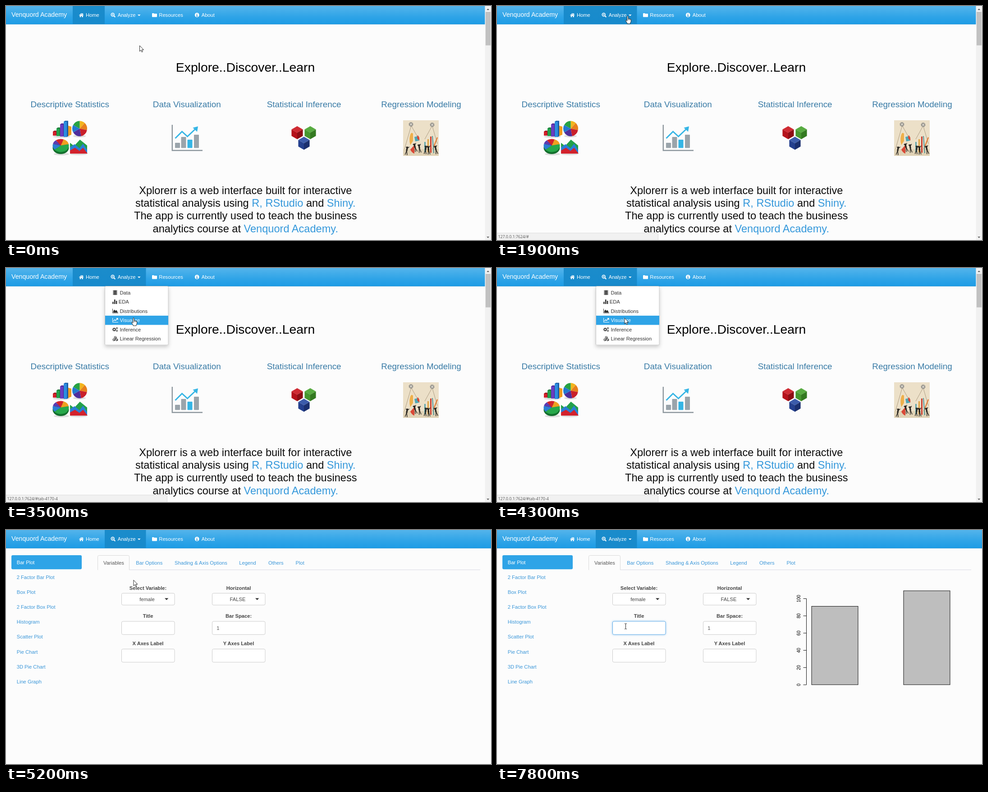
Write an HTML page that moves like this. It is 1076x520 px and loops after 8 s.

```html
<!DOCTYPE html>
<html lang="en">
<head>
<meta charset="utf-8">
<title>Statistics web app</title>
<style>
  html, body { margin: 0; width: 100%; height: 100%; overflow: hidden; background: #fcfcfc; }
  svg { display: block; width: 1076px; height: 520px; font-family: "Liberation Sans", Arial, sans-serif; }
  text { white-space: pre; }
</style>
</head>
<body>
<svg id="stage" viewBox="0 0 1076 520" xmlns="http://www.w3.org/2000/svg"></svg>
<script>
const BLUE = '#2fa4e7', LINK = '#3b97d9', DARK = '#178acc', INK = '#333';
const LOOP = 8000, STEP = 100;

const text = (x, y, s, size = 11.2, fill = INK, more = '') =>
  `<text x="${x}" y="${y}" font-size="${size}" fill="${fill}" ${more}>${s}</text>`;
const mid = (x, y, s, size, fill, more = '') => text(x, y, s, size, fill, 'text-anchor="middle" ' + more);
const rect = (x, y, w, h, fill, more = '') =>
  `<rect x="${x}" y="${y}" width="${w}" height="${h}" fill="${fill}" ${more}/>`;
const path = (d, fill = 'currentColor', more = '') => `<path d="${d}" fill="${fill}" ${more}/>`;
const line = (d, color, width = 1, more = '') => path(d, 'none', `stroke="${color}" stroke-width="${width}" ${more}`);
const disc = (x, y, r, fill, more = '') => `<circle cx="${x}" cy="${y}" r="${r}" fill="${fill}" ${more}/>`;
const group = (id, body, more = '') => `<g id="${id}" ${more}>${body}</g>`;
const at = (x, y, body) => `<g transform="translate(${x} ${y})">${body}</g>`;
const caret = (x, y, w, fill) => path(`M${x} ${y}h${w}l${-w / 2} ${w / 2}z`, fill);

// Icons, about 12 by 10 units, in the current colour
const ring = (x, y, r, w) => disc(x, y, r, 'none', `stroke="currentColor" stroke-width="${w}"`);
const axes = line('M.5 0V9.5H13', 'currentColor', 1);
const hexagon = (x, y, r) => {
  const p = [];
  for (let i = 0; i < 6; i++) p.push([x + r * Math.sin(i * Math.PI / 3), y - r * Math.cos(i * Math.PI / 3)]);
  return p;
};
const poly = (pts, fill, more = '') => `<polygon points="${pts.map(p => p.join()).join(' ')}" fill="${fill}" ${more}/>`;
const icons = {
  home: path('M0 5.6L5.2 .8L7.4 2.8V1.2H9V4.3L10.5 5.6L9.8 6.3L5.2 2.3L.7 6.3zM1.7 6.1L5.2 3.1L8.8 6.1V9.8H6.3V7H4.2V9.8H1.7z'),
  search: ring(4.2, 4.2, 3.4, 1.6) + line('M6.8 6.8L9.8 9.8', 'currentColor', 2) + line('M2.4 4.2H6M4.2 2.4V6', 'currentColor', 1),
  folder: path('M0 2Q0 1 1 1H3.6Q4.5 1 4.5 2H9.8Q11 2 11 3V8.6Q11 9.5 10 9.5H1Q0 9.5 0 8.5z'),
  info: disc(5, 5, 4.9, 'currentColor') + line('M5 1.8V3.3M5 4.2V8M3.8 4.7H5M3.7 8H6.4', DARK, 1.3),
  data: [0, 2.7, 5.4, 8].map(y => path(`M1 ${y + .8}Q6 ${y - 1} 11 ${y + .8}V${y + 1.5}Q6 ${y + 3.2} 1 ${y + 1.5}z`)).join(''),
  bars: rect(.2, 5, 2.4, 5, 'currentColor') + rect(3.9, 0, 2.6, 10, 'currentColor') + rect(7.8, 3, 2.6, 7, 'currentColor'),
  area: axes + path('M2 8.5V5L4.5 2L7 4.5L9.5 3L12 8.5z'),
  trend: axes + line('M2 7L5 4L7 5.8L11.5 1.4M8.7 1H12V4.2', 'currentColor', 1.4),
  gears: ring(4, 5.2, 2.5, 1.7) + ring(4, 5.2, 3.6, 1).replace('/>', ' stroke-dasharray="1.4 1.4"/>') + ring(10, 2.3, 1.5, 1.1) + ring(10, 8, 1.5, 1.1),
  cubes: [[6.5, 2.5], [3.4, 7.4], [9.6, 7.4]].map(([x, y]) =>
    poly(hexagon(x, y, 2.7), 'none', 'stroke="currentColor" stroke-width="1"') +
    path(`M${x} ${y}L${x + 2.3} ${y - 1.3}V${y + 1.3}L${x} ${y + 2.6}zM${x} ${y}L${x - 2.3} ${y - 1.3}`) +
    line(`M${x - 2.3} ${y - 1.3}L${x} ${y}`, 'currentColor', .8)).join('')
};
const icon = (name, x, y) => at(x, y, icons[name]);

// Top bar
const navItem = (name, ix, x, label) => icon(name, ix, 15) + text(x, 24, label, 11.2, '#fff');
const nav = rect(0, 0, 1076, 40, 'url(#bar)') + rect(0, 40, 1076, 1, '#4aa3d8') +
  group('homeOn', rect(148, 0, 71, 40, 'url(#on)')) + group('analyzeOn', rect(219, 0, 91.5, 40, 'url(#on)')) +
  `<g color="#fff">` + text(12, 24.3, 'Venquord Academy', 14.2, '#fff') +
  navItem('home', 162, 177, 'Home') + navItem('search', 232.5, 247.7, 'Analyze') + caret(292, 19, 6.6, '#fff') +
  navItem('folder', 324, 339.3, 'Resources') + navItem('info', 418.7, 433.7, 'About') + '</g>';

// Pictures on the start page
function pie(cx, cy, rx, ry, start, slices) {
  let a = start;
  const pt = v => `${cx + rx * Math.cos(v)} ${cy + ry * Math.sin(v)}`;
  return slices.map(([share, fill]) => {
    const b = a + share * 2 * Math.PI;
    const d = `M${cx} ${cy}L${pt(a)}A${rx} ${ry} 0 ${share > .5 ? 1 : 0} 1 ${pt(b)}z`;
    a = b;
    return path(d, fill);
  }).join('');
}
function bar3d(x, y, base, front, side) {
  return rect(x, y, 7, base - y, front) + path(`M${x + 7} ${y}l3 -2V${base - 2}l-3 2z`, side) + path(`M${x} ${y}l3 -2h7l-3 2z`, side);
}
const charts =
  `<ellipse cx="123" cy="290" rx="19" ry="3" fill="#ddd"/><ellipse cx="163" cy="289" rx="14" ry="3" fill="#ddd"/>` +
  `<ellipse cx="123" cy="329" rx="17" ry="3" fill="#ddd"/><ellipse cx="161" cy="329" rx="19" ry="2.5" fill="#ddd"/>` +
  bar3d(104, 279, 288, '#d3202b', '#8f1019') + bar3d(112, 272, 289, '#22a04a', '#126e2e') +
  bar3d(120, 263, 290, '#6a3cc0', '#44208a') + bar3d(128, 257, 291, '#2c8de0', '#1a5da8') +
  path('M138 266l7 2v18l-7 3z', '#f09a1c') +
  pie(163.5, 272.5, 16.5, 17, -1.57, [[.12, '#f2b51d'], [.16, '#e8801c'], [.19, '#c9202a'], [.2, '#4f2d9c'], [.16, '#2378d0'], [.17, '#27a243']]) +
  `<ellipse cx="121.5" cy="315" rx="18" ry="14" fill="#14702e"/>` +
  pie(121.5, 310, 18, 14.5, -.2, [[.42, '#27a84a'], [.15, '#2b7ed4'], [.11, '#5b3bb0'], [.16, '#d3222c'], [.16, '#f0a020']]) +
  path('M142 327V304L151 311L164 297L180 310V327z', '#22a04a') +
  path('M142 327V314L152 307L163 316L171 306L180 320V327z', '#2a7fd6') +
  path('M142 328V321L153 315L163 322L171 315L181 328z', '#d3222c');

const GREY = '#9aa4ab', CYAN = '#35b5e5';
const growth = line('M368.8 264V321H436', '#8b959c', 2.4) +
  [[375, 304, GREY], [388.5, 291, GREY], [402.5, 297, CYAN], [417, 286, GREY]]
    .map(([x, y, c]) => rect(x, y, 11, 315.5 - y, c, 'rx="1"')).join('') +
  line('M375.5 294L390.5 279L402.5 290L422 271.5', CYAN, 3) + path('M414.5 270.5L426 267.5L424 279.5z', CYAN);

function cube(x, y, top, left, right) {
  const p = hexagon(x, y, 14.5), c = [x, y];
  return poly([p[5], p[0], p[1], c], top) + poly([p[5], c, p[3], p[4]], left) + poly([c, p[1], p[2], p[3]], right);
}
const cubes = cube(646, 281.5, '#cf2b33', '#b5121b', '#8d0d14') + cube(675, 281.5, '#58ab41', '#46972f', '#347a21') +
  cube(661, 305, '#3c5cab', '#24408e', '#1a2f6e');

const worker = (x, y, tilt) => `<g transform="translate(${x} ${y}) rotate(${tilt})" stroke="#26231f" fill="none">` +
  disc(0, -13, 1.9, '#26231f', 'stroke="none"') + line('M0 -11V-5', '#26231f', 3.2) +
  line('M0 -6L-2 4M0 -6L2.6 4M0 -10L4 -15M0 -10L-3 -14', '#26231f', 1.4) + '</g>';
const team = rect(881, 254, 79, 79, '#ece0c8') + rect(881, 318, 79, 15, '#e0d2b5') +
  line('M899 266L884 318M899 266L917 298M945 267L929 296M946 268L957 306', '#9b8b70', .8) +
  [[898.5, 263], [945.5, 264]].map(([x, y]) => disc(x, y, 3.5, '#d9d5cb', 'stroke="#8c8a85" stroke-width="3" stroke-dasharray="2 .7"')).join('') +
  path('M899 282A9 19 0 0 0 897 309L903 300V283z', '#eeb04b') + path('M897 319L906 309V328Q900 326 897 319z', '#d94836') +
  path('M906 291l8 -2l3 10l-9 2z', '#4fa7b4') + path('M913 287q5 3 4 12l-5 -5z', '#d94836') +
  rect(928, 302, 3, 23, '#63a7ac') + rect(935, 296, 3, 29, '#e0a340') + rect(941, 290, 3, 36, '#cb3f32') +
  line('M947 318L957 292', '#e0813c', 2.4) + line('M946 289L949 327', '#51939a', 2) +
  [[888, 327, 10], [909, 320, -14], [918, 322, -8], [930, 325, 8], [938, 326, -5], [955, 325, -12]].map(w => worker(...w)).join('');

// Start page
const blue = s => `<tspan fill="#3498db">${s}</tspan>`;
const headings = [[141.7, 'Descriptive Statistics'], [401.3, 'Data Visualization'], [661.2, 'Statistical Inference'], [921, 'Regression Modeling']];
const intro = [
  'Xplorerr is a web interface built for interactive',
  `statistical analysis using ${blue('R, RStudio')} and ${blue('Shiny.')}`,
  'The app is currently used to teach the business',
  `analytics course at ${blue('Venquord Academy.')}`
];
const startPage = mid(531, 145.7, 'Explore..Discover..Learn', 28.3, '#000') +
  headings.map(([x, s]) => mid(x, 225.2, s, 18.9, '#397ba6')).join('') +
  charts + growth + cubes + team +
  intro.map((s, i) => mid(531.3, 417.6 + i * 28.4, s, 23.6, '#0a0a0a')).join('');

const scrollbar = rect(1062.5, 0, 13.5, 520, '#f1f1f1') + rect(1064, 13, 11, 74.5, '#c1c1c1') +
  path('M1066.3 9l3 -3.2l3 3.2z', '#606060') + path('M1066.3 512.5l3 3.2l3 -3.2z', '#606060');

// Drop-down menu
const ROW = 20.5, MENU_TOP = 44;
const menuItems = [['data', 'Data', 252.5], ['bars', 'EDA', 249.7], ['area', 'Distributions', 252.5],
  ['trend', 'Visualize', 252.5], ['gears', 'Inference', 252.5], ['cubes', 'Linear Regression', 252.5]];
const menu = rect(219.5, 40.5, 140.5, 130.5, '#fff', 'stroke="#c6c6c6" rx="2" filter="url(#shadow)"') +
  rect(220, 0, 140, ROW, BLUE, 'id="rowOn"') +
  menuItems.map(([name, label, x], i) =>
    group('item' + i, icon(name, 236, 49.5 + i * ROW) + text(x, 58.6 + i * ROW, label, 11.2, 'currentColor'))).join('');

const status = rect(-1, 504.5, 358.5, 17, '#f1f1f1', 'stroke="#dcdcdc" rx="2"') +
  text(2.5, 516.3, '', 8.75, '#555', 'id="url" style="font-family:\'Open Sans\',\'Noto Sans\',sans-serif"');

// Plot page
const sideItems = ['Bar Plot', '2 Factor Bar Plot', 'Box Plot', '2 Factor Box Plot', 'Histogram', 'Scatter Plot',
  'Pie Chart', '3D Pie Chart', 'Line Graph'];
const tabs = [[216, 'Variables'], [288.3, 'Bar Options'], [374, 'Shading &amp; Axis Options'], [517.3, 'Legend'], [582, 'Others'], [642.5, 'Plot']];
const label = (x, y, s) => mid(x, y, s, 11.15, '#444', 'font-weight="bold"');
const box = (x, y, h, id = '') => rect(x + .5, y + .5, 117.5, h, '#fff', `rx="3" stroke="#ccc" ${id}`);
const select = (x, s) => box(x, 140, 26.3) + mid(x + 57, 157.6, s, 11.2, '#444') + caret(x + 96, 151.6, 8.4, INK);
const plotPage = rect(12, 56, 156, 31.2, BLUE, 'rx="3"') +
  sideItems.map((s, i) => text(23.7, 75.9 + i * 33.1, s, 11.2, i ? LINK : '#fff')).join('') +
  line('M203 88.5H1052', '#d9d9e4') +
  path('M203.5 89.5V59.5Q203.5 56.5 206.5 56.5H270.5Q273.5 56.5 273.5 59.5V89.5', '#fcfcfc') +
  line('M203.5 88.5V59.5Q203.5 56.5 206.5 56.5H270.5Q273.5 56.5 273.5 59.5V88.5', '#d9d9d9') +
  tabs.map(([x, s], i) => text(x, 76.5, s, 11.2, i ? LINK : '#555')).join('') +
  label(315, 132.6, 'Select Variable:') + label(516, 132.6, 'Horizontal') +
  label(315, 194.8, 'Title') + label(516, 194.8, 'Bar Space:') +
  label(315, 256.2, 'X Axes Label') + label(516, 256.2, 'Y Axes Label') +
  select(256, 'female') + select(457, 'FALSE') +
  group('glow', rect(255.5, 202.5, 119, 30.5, '#66afe9', 'rx="4" filter="url(#blur)"')) +
  box(256, 202.5, 29.3, 'id="titleBox"') + box(457, 202.5, 29.3) + text(467.3, 221.5, '1', 11.2, '#555') +
  box(256, 264, 29.3) + box(457, 264, 29.3);

const tickY = v => 344 - v * 1.915;
const ticks = [0, 20, 40, 60, 80, 100];
const barPlot = line(`M686.5 344V${tickY(100)}` + ticks.map(v => `M686.5 ${tickY(v)}h-7`).join(''), '#111') +
  ticks.map(v => mid(0, 0, v, 10, '#000', `transform="translate(672.5 ${tickY(v)}) rotate(-90)"`)).join('') +
  [[698, 91], [902, 109]].map(([x, n]) => rect(x, tickY(n) - .2, 103, 344 - tickY(n), '#bebebe', 'stroke="#111"')).join('');

// Pointers, with the hot spot at the origin
const outline = 'stroke="#111" stroke-width=".9" stroke-linejoin="round"';
const pointers = {
  arrow: path('M0 0V12.8L2.9 10.1L4.8 14.4L6.8 13.5L4.9 9.3H8.9z', '#fff', outline),
  hand: path('M-1.2 1Q-1.2 -.4 0 -.4Q1.2 -.4 1.2 1V5.6Q2.6 4.8 3.4 6Q4.9 5.3 5.7 6.7Q7.3 6.2 7.5 8V11.4Q7.3 13.4 6 15V17H-1V15.2Q-3.2 12.6 -4.4 10Q-4.4 8.5 -3 9L-1.2 10.8z', '#fff', outline) +
    line('M1.2 5.6V9M3.4 6V9M5.7 6.7V9', '#111', .8),
  beam: line('M-2.5 -6H-.6L0 -5.4L.6 -6H2.5M0 -5.4V5.4M-2.5 6H-.6L0 5.4L.6 6H2.5', '#222', 1)
};

const stage = document.getElementById('stage');
stage.innerHTML = `<defs>
  <linearGradient id="bar" x2="0" y2="1"><stop stop-color="#54b4eb"/><stop offset=".6" stop-color="${BLUE}"/><stop offset="1" stop-color="#1d9ce5"/></linearGradient>
  <linearGradient id="on" x2="0" y2="1"><stop stop-color="#1b8ccb"/><stop offset="1" stop-color="${DARK}"/></linearGradient>
  <filter id="shadow" x="-10%" y="-10%" width="120%" height="125%"><feDropShadow dx="0" dy="4" stdDeviation="4" flood-opacity=".2"/></filter>
  <filter id="blur" x="-10%" y="-30%" width="120%" height="160%"><feGaussianBlur stdDeviation="2.3"/></filter>
  </defs>` + rect(0, 0, 1076, 520, '#fcfcfc') +
  group('start', startPage) + group('plots', plotPage + group('chart', barPlot)) + nav +
  group('scroll', scrollbar) + group('menu', menu) + group('status', status) +
  group('pointer', Object.keys(pointers).map(k => group(k, pointers[k])).join(''));

const el = id => document.getElementById(id);
const show = (id, on) => el(id).setAttribute('display', on ? 'inline' : 'none');

// Pointer route: time, x, y
const route = [[0, 296.5, 88], [400, 296.5, 88], [1400, 289.8, 22.5], [2200, 289.8, 22.5], [2700, 284.6, 68.2], [3100, 284.6, 68.2],
  [3500, 283, 111.3], [6200, 283, 111.3], [6500, 283, 131.3], [7000, 284.5, 203], [7300, 285.5, 214], [LOOP, 285.5, 214]];
function pointerAt(t) {
  const i = Math.max(1, route.findIndex(k => k[0] > t));
  const [t0, x0, y0] = route[i - 1], [t1, x1, y1] = route[i];
  const u = (t - t0) / (t1 - t0), e = u * u * (3 - 2 * u);
  const slow = t > 6200 && t < 7000 ? u : e;
  return [x0 + (x1 - x0) * slow, y0 + (y1 - y0) * slow];
}

function draw(ms) {
  const t = Math.floor(ms % LOOP / STEP) * STEP;
  const within = (a, b) => t >= a && t < b;
  const onPlots = t >= 4900;

  show('start', !onPlots);
  show('scroll', !onPlots);
  show('homeOn', !onPlots);
  show('plots', onPlots);
  show('chart', t >= 6400);
  show('analyzeOn', t >= 1400);
  show('menu', within(2200, 4900));
  show('status', within(1400, 4600));

  const row = t < 2800 ? -1 : t < 3300 ? 1 : t < 3500 ? 2 : 3;
  show('rowOn', row >= 0);
  el('rowOn').setAttribute('y', MENU_TOP + .4 + row * ROW);
  menuItems.forEach((_, i) => el('item' + i).setAttribute('color', i === row ? '#fff' : INK));
  el('url').textContent = '127.0.0.1:7624/#' + (row < 0 ? '' : 'tab-4170-' + (row + 1));

  const focus = Math.min(1, Math.max(0, (t - 7300) / 200));
  el('glow').setAttribute('opacity', focus * .6);
  el('titleBox').setAttribute('stroke', focus ? '#66afe9' : '#ccc');

  const [x, y] = pointerAt(t);
  const hand = within(1400, 3700) || (onPlots && y > 140 && y < 167);
  const beam = onPlots && y >= 203;
  el('pointer').setAttribute('transform', `translate(${x} ${y})`);
  show('hand', hand);
  show('beam', beam);
  show('arrow', !hand && !beam);
}

const begin = performance.now();
function tick() {
  draw(performance.now() - begin);
  requestAnimationFrame(tick);
}
draw(0);
requestAnimationFrame(tick);
</script>
</body>
</html>
```
